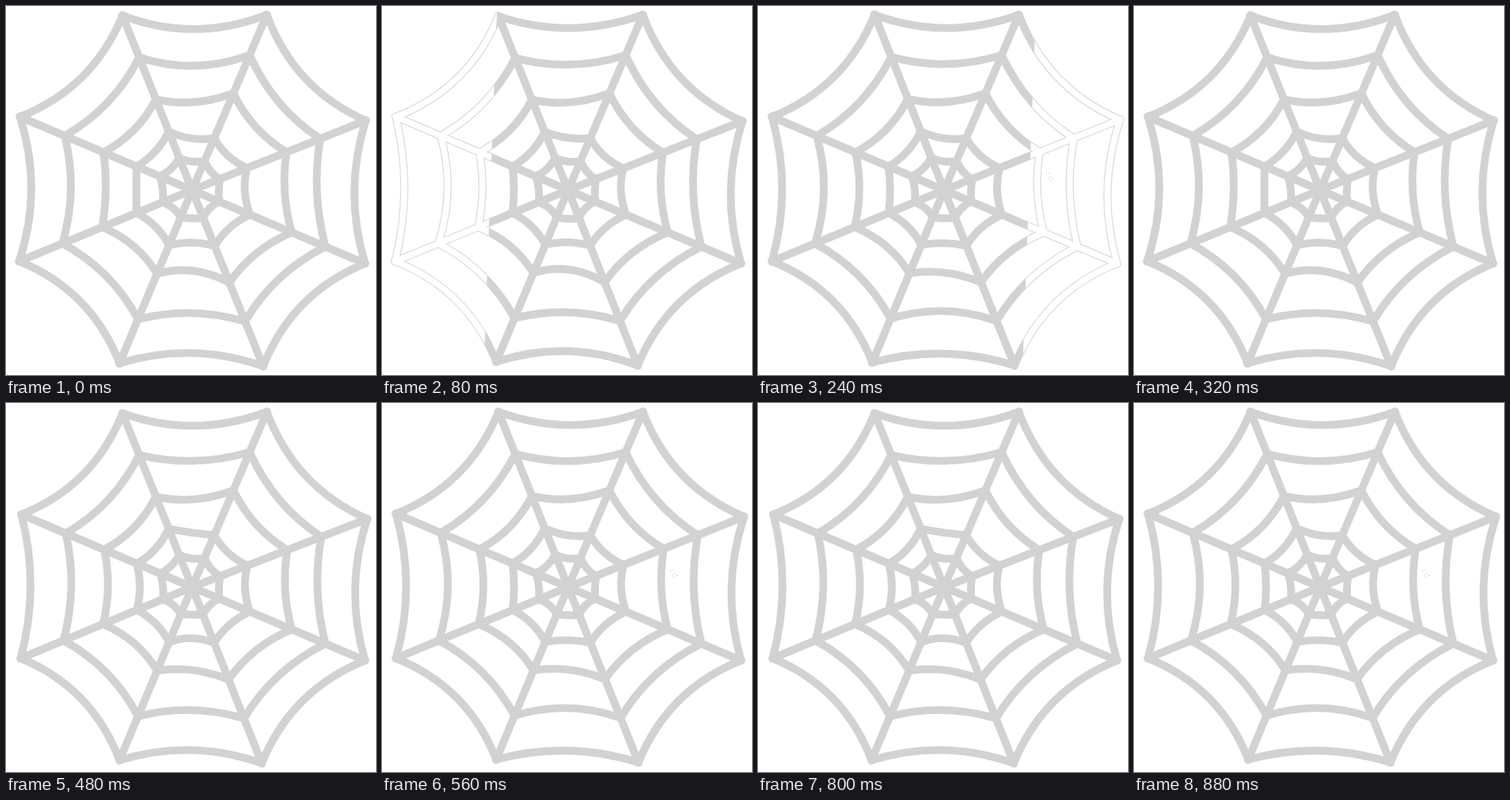
These frames come from a looping animation (505x503 px, 0.96 s). An HTML page with a canvas:

```html
<!DOCTYPE html>
<html lang="en">
<head>
<meta charset="utf-8">
<title>Spider web</title>
<style>
html, body { margin: 0; width: 100%; height: 100%; overflow: hidden; background: #fff; }
canvas { display: block; }
</style>
</head>
<body>
<canvas id="stage" width="505" height="503"></canvas>
<script>
const ctx = document.getElementById('stage').getContext('2d');
const W = 505, H = 503, STEP = 80, STEPS = 12;
const GREY = '#d2d2d2', EDGE = '#dadada';
const CENTER = [254, 251];

const TIPS = [[159, 13], [356, 12], [491, 156], [490, 351],
              [351, 491], [155, 487], [18, 348], [19, 151]];

// Where the inner rings cross each spoke, as a share of its length
const KNOTS = [
  [.76, .52, .336, .185], [.77, .552, .297, .167],
  [.738, .544, .316, .16], [.771, .576, .335, .157],
  [.746, .525, .317, .158], [.746, .483, .318, .157],
  [.75, .52, .322, .17], [.74, .515, .323, .187]
];

// Inward sag of each ring in px, outermost first
const SAG = {
  top: [19, 13, 8, 5, 3],
  right: [15, 8, 6, 5, 1],
  bottom: [16, 10, 10, 4, -1],
  left: [16, 10, 4, 0, 2],
  diagonal: [21, 11, 8, 5, 3]
};
const SIDES = { 0: 'top', 2: 'right', 4: 'bottom', 6: 'left' };

// The hand-drawn wobble: tip offsets and changes of sag
const POSES = [
  { tips: {}, sag: {} },
  { tips: { 0: [0, 1], 2: [1, 1], 4: [-2, -1], 5: [1, -2] },
    sag: { top: [-2, -2, 0, -1, 0], bottom: [1, 0, 1, 0, -1], left: [-4, 1, 1, 2, 0] } },
  { tips: { 0: [0, 1], 2: [2, 2], 4: [-2, 0], 6: [2, 0], 7: [2, 1] },
    sag: { top: [-1, -3, 0, -4, 0], bottom: [0, 0, -3, 2, 1], left: [-3, -1, 2, 4, 0] } },
  { tips: { 0: [0, -1], 2: [3, -1], 4: [-1, -1], 5: [1, -1], 6: [1, 0] },
    sag: { top: [-1, -2, 0, 0, 0], bottom: [-2, 2, -3, -1, 0], left: [-2, 1, 2, 2, 0] } }
];

const mix = (a, b, k) => [a[0] + (b[0] - a[0]) * k, a[1] + (b[1] - a[1]) * k];

function buildWeb(pose) {
  const path = new Path2D();
  const tips = TIPS.map(([x, y], i) => {
    const [dx, dy] = pose.tips[i] || [0, 0];
    return [x + dx, y + dy];
  });
  for (const tip of tips) {
    path.moveTo(...tip);
    path.lineTo(...CENTER);
  }
  const knot = (spoke, ring) =>
    mix(CENTER, tips[spoke], ring ? KNOTS[spoke][ring - 1] : 1);
  for (let ring = 0; ring < 5; ring++) {
    for (let i = 0; i < 8; i++) {
      const side = SIDES[i] || 'diagonal';
      const a = knot(i, ring), b = knot((i + 1) % 8, ring);
      const mid = mix(a, b, .5);
      const sag = SAG[side][ring] + (pose.sag[side] ? pose.sag[side][ring] : 0);
      const reach = Math.hypot(mid[0] - CENTER[0], mid[1] - CENTER[1]);
      path.moveTo(...a);
      path.quadraticCurveTo(...mix(mid, CENTER, 2 * sag / reach), ...b);
    }
  }
  return { path, tips };
}

const webs = POSES.map(buildWeb);

function drawWeb({ path, tips }, color, width) {
  ctx.strokeStyle = ctx.fillStyle = color;
  ctx.lineWidth = width;
  ctx.stroke(path);
  for (const [x, y] of tips) {
    ctx.beginPath();
    ctx.arc(x, y, width / 2 + .6, 0, 2 * Math.PI);
    ctx.fill();
  }
}

// A slanted band in which only the outline of the web remains
function drawShine(web, shift) {
  const slant = .037 * H, left = 157.5 + shift, right = 379 + shift;
  ctx.save();
  ctx.beginPath();
  ctx.moveTo(left, 0);
  ctx.lineTo(right, 0);
  ctx.lineTo(right - slant, H);
  ctx.lineTo(left - slant, H);
  ctx.clip();
  ctx.fillStyle = '#fff';
  ctx.fillRect(0, 0, W, H);
  drawWeb(web, EDGE, 11);
  drawWeb(web, '#fff', 8.4);
  ctx.restore();
}

function drawSpecks() {
  ctx.fillStyle = GREY;
  for (const [x, y] of [[393, 228], [397, 227], [398, 232], [396, 235], [402, 234], [399, 237]])
    ctx.fillRect(x, y, 1.4, 1.4);
}

function render(time) {
  const step = Math.floor(time / STEP) % STEPS;
  const web = webs[step % 4];
  ctx.fillStyle = '#fff';
  ctx.fillRect(0, 0, W, H);
  ctx.lineCap = ctx.lineJoin = 'round';
  drawWeb(web, GREY, 10.6);
  if (step >= 1 && step <= 3) drawShine(web, (step - 2) * 222);
  if (step % 4 === 3) drawSpecks();
}

const start = performance.now();
function tick() {
  render(performance.now() - start);
  requestAnimationFrame(tick);
}
tick();
</script>
</body>
</html>
```
